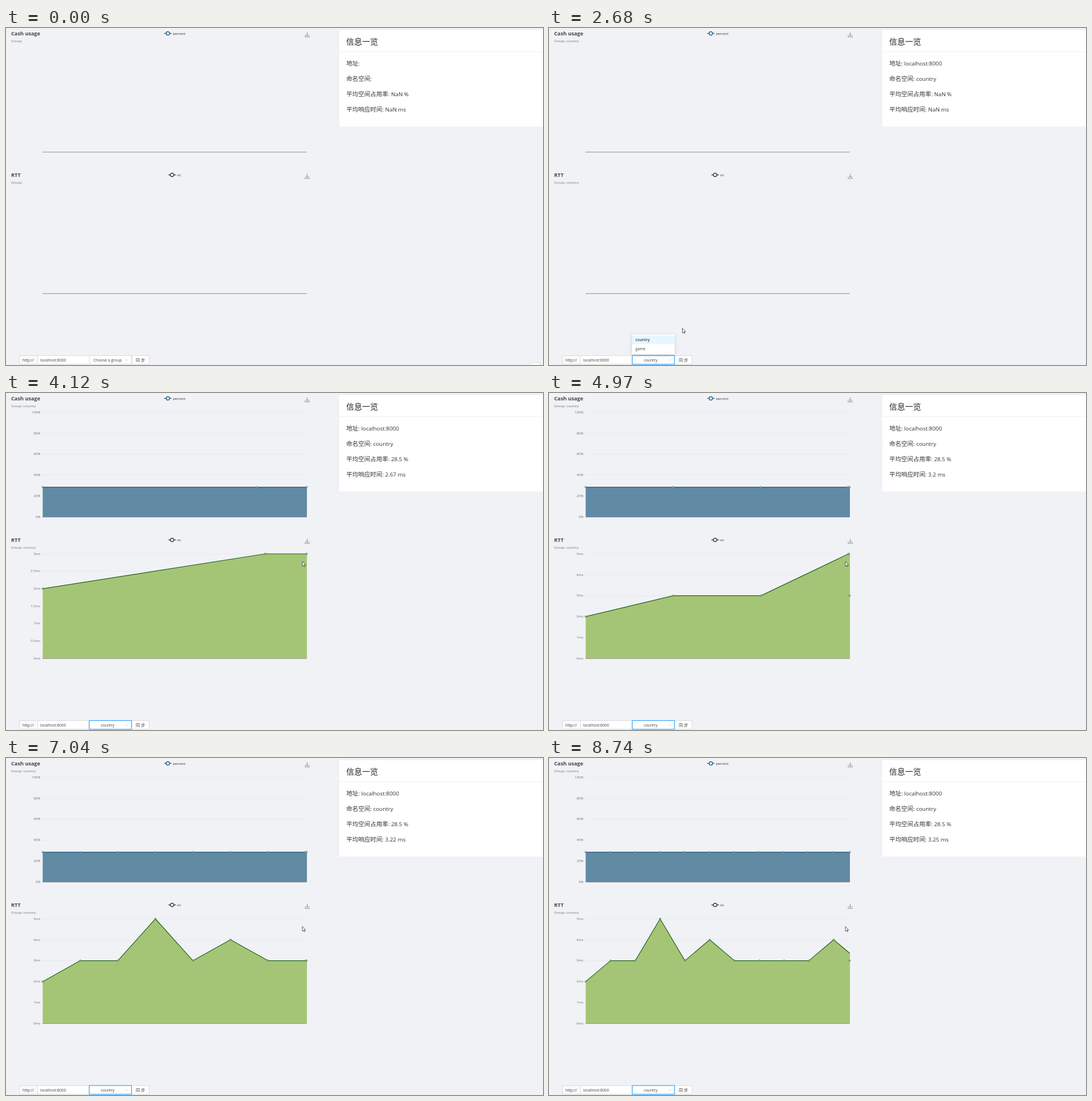
These frames come from a looping animation (944 px wide and 593 px high, 8.8 s). An HTML page:

```html
<!DOCTYPE html>
<html lang="zh-CN">
<head>
<meta charset="utf-8">
<title>Cache monitor</title>
<style>
  html, body { margin: 0; width: 100%; height: 100%; overflow: hidden; background: #f0f2f6; }
  svg { display: block; width: 944px; height: 593px; }
  text { font-family: "Open Sans", "Noto Sans CJK SC", "Noto Sans CJK", sans-serif; fill: #333; white-space: pre; }
  .title { font-size: 9.2px; font-weight: 700; fill: #464646; }
  .small { font-size: 6.15px; fill: #6e7079; }
  .legend { font-size: 6.15px; fill: #333; }
  .heading { font-size: 14px; fill: #262626; }
  .info { font-size: 9.85px; fill: #333; }
  .info .han { font-size: 10.5px; }
  .form { font-size: 6.75px; fill: #404040; }
  .box { fill: #fff; stroke: #dcdcdc; stroke-width: 1; }
  .icon { fill: none; stroke: #858585; stroke-width: .9; }
  .mid { text-anchor: middle; }
  .end { text-anchor: end; }
</style>
</head>
<body>
<svg viewBox="0 0 944 593" xmlns="http://www.w3.org/2000/svg">
  <defs>
    <clipPath id="clip0"><rect x="63.5" y="33" width="465.5" height="186"/></clipPath>
    <clipPath id="clip1"><rect x="63.5" y="282" width="465.5" height="186"/></clipPath>
    <filter id="shadow" x="-20%" y="-40%" width="140%" height="180%">
      <feDropShadow dx="0" dy="1.5" stdDeviation="3" flood-opacity=".16"/>
    </filter>
    <path id="download" class="icon" d="M4 0V6.3M1.4 3.8L4 6.4L6.6 3.8M.4 5.6V8.3H7.6V5.6"/>
  </defs>

  <text class="title" x="9" y="13.3">Cash usage</text>
  <text class="small group" x="9" y="24.8"></text>
  <g stroke="#2f6082" stroke-width="1.4" fill="#fff"><path d="M278 9.5H291"/><circle cx="284.5" cy="9.5" r="3"/></g>
  <text class="legend" x="293.5" y="11.8">percent</text>
  <use href="#download" x="525.5" y="7.5"/>
  <g id="cash"></g>

  <text class="title" x="9" y="262.3">RTT</text>
  <text class="small group" x="9" y="273.8"></text>
  <g stroke="#284a28" stroke-width="1.4" fill="#fff"><path d="M285.500 258.500H298.500"/><circle cx="292" cy="258.500" r="3"/></g>
  <text class="legend" x="300.500" y="260.800">rtt</text>
  <use href="#download" x="525.5" y="256.500"/>
  <g id="rtt"></g>

  <rect x="586" y="4" width="358" height="169.500" fill="#fff"/>
  <path d="M586 41.500H944" stroke="#f0f0f0"/>
  <text class="heading" x="598" y="28.700">信息一览</text>
  <text class="info" x="598.3" y="66.300"><tspan class="han">地址</tspan>: <tspan id="address"></tspan></text>
  <text class="info" x="598.3" y="93.300"><tspan class="han">命名空间</tspan>: <tspan id="space"></tspan></text>
  <text class="info" x="598.3" y="120.300"><tspan class="han">平均空间占用率</tspan>: <tspan id="usage"></tspan> %</text>
  <text class="info" x="598.3" y="147.300"><tspan class="han">平均响应时间</tspan>: <tspan id="delay"></tspan> ms</text>

  <rect class="box" x="23.500" y="576.500" width="32" height="15" style="fill:#fafafa"/>
  <text class="form mid" x="39" y="586.500">http://</text>
  <rect class="box" x="55.500" y="576.500" width="91" height="15"/>
  <text class="form" x="60" y="586.500">localhost:8000</text>
  <rect class="box" id="button" x="221.500" y="576.500" width="30" height="15"/>
  <text class="form mid" id="sync" x="236.300" y="586.800" style="font-size:7.4px">同 步</text>
  <rect id="glow" x="145" y="575" width="77" height="18" rx="1.500" fill="#bfe0fb"/>
  <rect class="box" id="select" x="146.500" y="576.500" width="74" height="15"/>
  <text class="form mid" id="choice" x="178.600" y="586.500"></text>
  <path d="M209.800 583L212 585.300L214.200 583" fill="none" stroke="#c4c4c4" stroke-width=".8"/>

  <g id="menu">
    <rect x="146" y="539" width="75" height="35" fill="#fff" filter="url(#shadow)"/>
    <rect id="option" x="146" y="541" width="75" height="15.500"/>
    <text class="form" id="country" x="152" y="551">country</text>
    <text class="form" x="152" y="566.800">game</text>
  </g>

  <rect id="corner" x="920.500" y="588.500" width="18" height="8" fill="#f8f8f9" stroke="#dedfe2"/>
  <path id="cursor" d="M0 0V8.300L1.900 6.600L3.200 9.300L4.400 8.700L3.200 6.100H5.700Z" fill="#fff" stroke="#333" stroke-width=".8"/>
</svg>

<script>
const LOOP = 8800, LEFT = 64.5, WIDTH = 464, HEIGHT = 184;
const $ = id => document.getElementById(id);
const clamp = v => Math.min(1, Math.max(0, v));
const lerp = (a, b, p) => a + (b - a) * p;
const cubicInOut = p => p < .5 ? 4 * p ** 3 : 1 - (2 - 2 * p) ** 3 / 2;
const smooth = p => p * p * (3 - 2 * p);

// One response arrives about every half second.
const delays = [2, 3, 3, 5, 3, 4, 3, 3, 3, 3, 4, 3];
const arrivals = [2895, 3400, 3907, 4400, 4892, 5394, 5910, 6426, 6942, 7448, 7954, 8460];
const usage = delays.map(() => 28.5);

const charts = [
  { id: 'cash', bottom: 218, lead: 13, values: usage, unit: '%', line: '#2c5c7c', area: '#3e7190',
    max: () => 100, step: () => 20 },
  { id: 'rtt', bottom: 467, lead: 0, values: delays, unit: 'ms', line: '#23611f', area: '#93bb57',
    max: n => Math.max(...delays.slice(0, n)), step: max => max > 3 ? 1 : .5 }
];

// Pointer stops: time, x, y
const path = [
  [460, 290, 593], [760, 238, 582], [1080, 238, 582], [1330, 196, 583], [1600, 196, 583],
  [1900, 186, 548], [2350, 186, 548], [2680, 234.5, 528.3], [3080, 521, 296.5]
];

const countAt = t => arrivals.filter(a => a <= t).length;

function drawChart(chart, index, time) {
  const t = time + chart.lead, n = countAt(t);
  const { bottom, values, unit, line, area } = chart;
  let out = '';
  const axis = `<path d="M64 ${bottom + .3}H528.5" stroke="#8b8d93" stroke-width="1"/>`;
  if (!n) { $(chart.id).innerHTML = axis; return; }

  const before = Math.max(1, n - 1);
  const p = cubicInOut(clamp((t - arrivals[n - 1]) / 500));
  const max = chart.max(n), oldMax = chart.max(before);
  const xOf = (i, count) => LEFT + WIDTH * (count > 1 ? i / (count - 1) : .5);
  const yOf = (v, top) => bottom - v / top * HEIGHT;
  const yNow = v => lerp(yOf(v, oldMax), yOf(v, max), p);

  for (let v = 0; v <= max; v += chart.step(max)) {
    const y = v <= oldMax ? yNow(v) : yOf(v, max);
    if (v) out += `<path d="M64 ${y}H528.5" stroke="#e3e7ee" stroke-width=".8"/>`;
    out += `<text class="small end" x="60.5" y="${y + 1.7}">${v}${unit}</text>`;
  }

  const points = values.slice(0, n).map((v, i) =>
    [lerp(xOf(i, before), xOf(i, n), p), yNow(v)]);
  const d = 'M' + points.map(q => q.join(' ')).join('L');
  out += axis + `<g clip-path="url(#clip${index})">`;
  if (n > 1) {
    out += `<path d="${d}L${points[n - 1][0]} ${bottom}L${points[0][0]} ${bottom}Z" fill="${area}" fill-opacity=".8"/>`
      + `<path d="${d}" fill="none" stroke="${line}" stroke-width="1.2" stroke-linejoin="bevel"/>`;
  }
  out += '</g>';

  // The newest marker sits at its final place while the line catches up.
  points[n - 1] = [xOf(n - 1, n), yOf(values[n - 1], max)];
  for (const [x, y] of points)
    out += `<circle cx="${x}" cy="${y}" r="1.3" fill="#e8efe8" stroke="${line}" stroke-width=".9"/>`;
  $(chart.id).innerHTML = out;
}

function moveCursor(t) {
  $('cursor').style.display = t < path[0][0] ? 'none' : '';
  let k = path.findIndex(s => s[0] > t);
  if (k < 0) k = path.length;
  const a = path[Math.max(0, k - 1)], b = path[Math.min(k, path.length - 1)];
  const p = b[0] > a[0] ? smooth((t - a[0]) / (b[0] - a[0])) : 0;
  $('cursor').setAttribute('transform', `translate(${lerp(a[1], b[1], p)} ${lerp(a[2], b[2], p)})`);
}

function average(list, n) {
  return n ? +(list.slice(0, n).reduce((a, b) => a + b) / n).toFixed(2) : NaN;
}

function setText(node, text) {
  if (node.textContent !== text) node.textContent = text;
}

function render(t) {
  const chosen = t >= 2480, n = countAt(t);
  document.querySelectorAll('.group').forEach(g => setText(g, 'Group: ' + (chosen ? 'country' : '')));
  setText($('address'), t >= 930 ? 'localhost:8000' : '');
  setText($('space'), chosen ? 'country' : '');
  setText($('usage'), String(average(usage, n)));
  setText($('delay'), String(average(delays, n)));
  setText($('choice'), chosen ? 'country' : 'Choose a group');

  const active = t >= 700 && t < 1420;
  $('button').style.stroke = active ? '#40a9ff' : '';
  $('sync').style.fill = active ? '#40a9ff' : '';
  const focused = t >= 1420;
  $('select').style.stroke = focused || t >= 1260 ? '#40a9ff' : '';
  $('glow').style.opacity = focused ? 1 : 0;

  const open = clamp((t - 1450) / 180) * (1 - clamp((t - 2700) / 180));
  $('menu').style.display = open ? '' : 'none';
  $('menu').style.opacity = open;
  $('menu').setAttribute('transform', `translate(0 ${574 * .2 * (1 - open)}) scale(1 ${.8 + .2 * open})`);
  $('option').setAttribute('fill', chosen ? '#e6f7ff' : '#f5f5f5');
  $('country').style.fontWeight = chosen ? 600 : 400;

  $('corner').style.display = t < 70 ? '' : 'none';
  charts.forEach((chart, i) => drawChart(chart, i, t));
  moveCursor(t);
}

const start = performance.now();
function tick() {
  render((performance.now() - start) % LOOP);
  requestAnimationFrame(tick);
}
tick();
</script>
</body>
</html>
```
